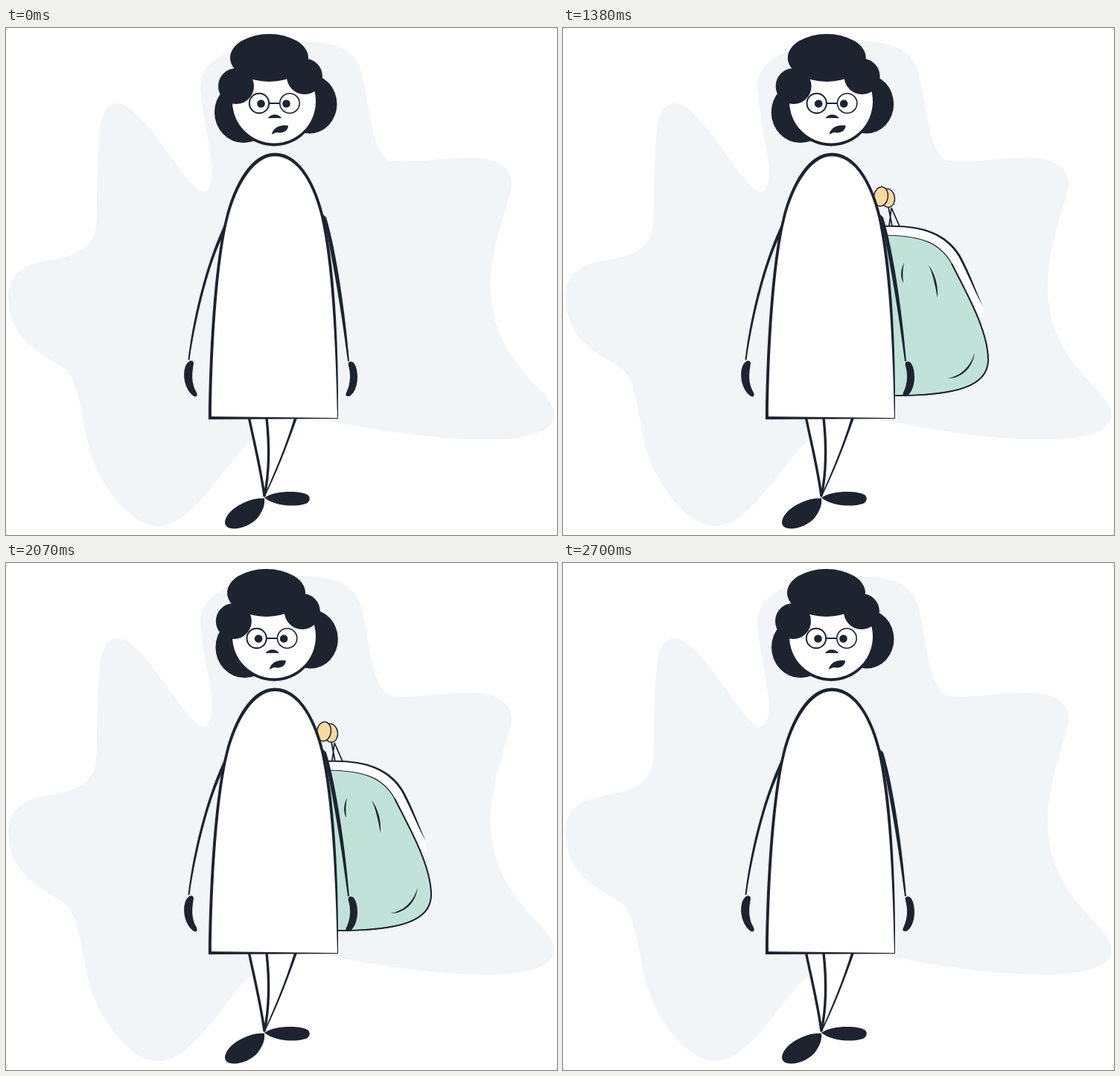
An HTML page with a canvas for the animation above (9 s loop, 740 px wide and 680 px high).

```html
<!DOCTYPE html>
<html lang="en">
<head>
<meta charset="utf-8">
<title>Hidden purse</title>
<style>
html, body { margin: 0; width: 100%; height: 100%; overflow: hidden; background: #fff; }
canvas { display: block; width: 740px; height: 680px; }
</style>
</head>
<body>
<canvas id="stage" width="740" height="680"></canvas>
<script>
const ctx = document.getElementById('stage').getContext('2d');
const LOOP = 9000;
const INK = '#1d2430', WHITE = '#fff', MIST = '#f1f5f8', MINT = '#c1e2d9', PEACH = '#f9d8a2';
const shape = d => new Path2D(d);

const blob = shape(`M150 101 C175 101 215 165 240 198 C250 211 260 220 265 220
  C275 219 278 200 276 180 C273 155 261 100 261 78 C261 52 283 35 320 26
  C350 18 380 18 405 18 C440 19 468 28 477 58 C487 92 490 165 514 177
  C535 183 590 173 630 174 C665 175 681 192 679 212 C676 235 651 290 651 345
  C651 400 672 435 700 467 C720 488 737 505 737 520 C735 545 690 552 645 552
  C580 552 500 540 445 529 C410 523 370 520 326 556 C290 590 250 668 205 668
  C165 668 125 610 112 565 C100 520 100 485 84 462 C72 445 3 430 3 360
  C3 333 22 317 55 312 C95 306 118 295 121 265 C124 230 120 170 128 125
  C132 108 141 101 150 101Z`);

const dressOuter = shape(`M272 525 C273 420 281 310 294.5 256 C306 208 330 167.5 361 167.5
  C397 167.5 418 215 427 253 C441 315 447 420 446 524Z`);
const dressInner = shape(`M276 521 C277 420 285 310 298 257 C309 212 333 172 361 172
  C394 172 414 215 423 253 C437 315 443 420 445 523Z`);

const leftArm = shape('M295 260 C273 305 253 375 244.5 445 L246.5 445 C256 380 275 310 292 278Z');
const leftHand = shape(`M245 448 C236 455 237 482 251 493 C255 496 258 494 256 489
  C248 476 250 462 252 450 C252 446 248 445 245 448Z`);
const rightArm = shape('M426 250 C435 295 448 360 459 447 L461 447 C456 385 444 300 430 254Z');
const rightHand = shape(`M461 448 C467 444 472 455 472 468 C472 482 466 493 460 494
  C455 494 456 491 458 487 C463 476 463 463 460 453 C459 450 460 448 461 448Z`);

const legFill = shape('M326.5 523 L389 523 L347 628Z');
const legs = shape('M326.5 523 C333 555 342 590 347 628 M350 523 C354 560 354 595 347 628');
const rightLeg = shape('M387 523 L391 523 C378 560 362 600 347 630 L346 629 C360 598 376 560 387 523Z');
const shoes = shape(`M347 631 C330 628 294 645 294 664 C296 677 325 672 338 657
  C345 647 348 640 347 631Z M347 630 C360 620 395 620 405 626 C409 629 409 635 403 638
  C388 643 360 641 347 630Z`);

const nose = shape('M352 121 C355 114.5 367 114.5 370 121 C365 120.5 357 120.5 352 121Z');
const mouth = shape('M357 143 C358 135 367 129 379 131 C379 138 371 142 365 140 C361 140 359 142 357 143Z');

const bandFill = shape(`M400 266 L430 266 C480 264 513 275 532 305 C546 330 553 352 563 371
  L566 388 L540 385 L400 300Z`);
const bandEdge = shape(`M400 265 L430 265 C481 263 514 274 533 304 C547 329 554 352 564 373
  C554 357 545 332 531 306 C512 276 480 265 430 267 L400 267Z`);
const bag = shape(`M400 278 L433 278 C483 279 506 288 522 316 C540 352 571 405 571 445
  C571 480 530 493 445 493 L400 493Z`);
const bagEdge = shape('M522 316 C540 352 571 405 571 445 C571 480 530 493 445 493');
const stems = shape('M437 240 L442 266 M441 241 L452 266 M441 242 L438 265');
const creases = shape(`M458 315 C453 325 453 334 457 342 C456 333 456 324 458 315Z
  M491 318 C497 331 500 346 503 362 C504 346 500 330 491 318Z
  M516 470 C534 467 547 455 553 435 C550 457 535 470 516 470Z`);

function fill(path, color = INK) {
  ctx.fillStyle = color;
  ctx.fill(path);
}

function stroke(path, width) {
  ctx.strokeStyle = INK;
  ctx.lineWidth = width;
  ctx.stroke(path);
}

function oval(x, y, rx, ry = rx, tilt = 0) {
  const p = new Path2D();
  p.ellipse(x, y, rx, ry, tilt, 0, Math.PI * 2);
  return p;
}

function shifted(dx, draw) {
  ctx.save();
  ctx.translate(dx, 0);
  draw();
  ctx.restore();
}

function turn(x, y, degrees) {
  ctx.translate(x, y);
  ctx.rotate(degrees * Math.PI / 180);
  ctx.translate(-x, -y);
}

const ease = p => (1 - Math.cos(Math.PI * p)) / 2;

// Eased value through [time, value] keys.
function track(t, keys) {
  if (t <= keys[0][0]) return keys[0][1];
  for (let i = 1; i < keys.length; i++) {
    const [t0, a] = keys[i - 1], [t1, b] = keys[i];
    if (t < t1) return a + (b - a) * ease((t - t0) / (t1 - t0));
  }
  return keys[keys.length - 1][1];
}

const purseKeys = [[960, -128], [1200, 0], [2400, 0], [2700, -128]];
const headKeys = [[1320, 0], [1620, 8], [1920, -8], [2220, 0]];
const armKeys = [[2130, 0], [2400, 1], [2700, 0]];

function drawPurse(dx) {
  ctx.save();
  // Only the half beyond the dress's middle can show.
  ctx.beginPath();
  ctx.rect(361, 0, 379, 680);
  ctx.clip();
  ctx.translate(dx, 0);
  stroke(stems, 1.8);
  for (const knob of [oval(436, 228, 9.5, 12.5, -0.15), oval(427, 226, 9.5, 13, 0.15)]) {
    fill(knob, PEACH);
    stroke(knob, 1.5);
  }
  fill(bandFill, WHITE);
  fill(bandEdge);
  fill(bag, MINT);
  stroke(bag, 1.2);
  stroke(bagEdge, 2);
  fill(creases);
  ctx.restore();
}

function drawHead(k) {
  shifted(-0.36 * k, () => {
    fill(oval(319, 113, 39, 41));
    fill(oval(408, 102, 36.5, 39.5));
  });
  fill(oval(360, 101, 57.5));
  fill(oval(360, 98.5, 56), WHITE);
  shifted(0.85 * k, () => {
    stroke(oval(340, 101, 13.2), 2);
    stroke(oval(381, 101, 13.2), 1.6);
    stroke(shape('M353 101 L368 101'), 2);
    fill(oval(342.5, 101.5, 5.3));
    fill(oval(376.5, 101.5, 5.3));
  });
  shifted(0.8 * k, () => {
    fill(nose);
    fill(mouth);
    fill(oval(309, 78, 24));
    fill(oval(401, 65, 24));
  });
  shifted(k, () => fill(oval(353.5, 40, 52.5, 32)));
}

function drawRightArm(swing) {
  ctx.save();
  turn(430, 250, -17.6 * swing);
  fill(rightArm);
  turn(460, 447, -14 * swing);
  fill(rightHand);
  ctx.restore();
}

function draw(t) {
  ctx.fillStyle = WHITE;
  ctx.fillRect(0, 0, 740, 680);
  fill(blob, MIST);
  drawPurse(track(t, purseKeys));
  fill(legFill, WHITE);
  stroke(legs, 3.4);
  fill(rightLeg);
  fill(shoes);
  fill(leftArm);
  fill(leftHand);
  fill(dressOuter);
  fill(dressInner, WHITE);
  drawRightArm(track(t, armKeys));
  drawHead(track(t, headKeys));
}

const start = performance.now();
function tick() {
  draw((performance.now() - start) % LOOP);
  requestAnimationFrame(tick);
}
tick();
</script>
</body>
</html>
```
